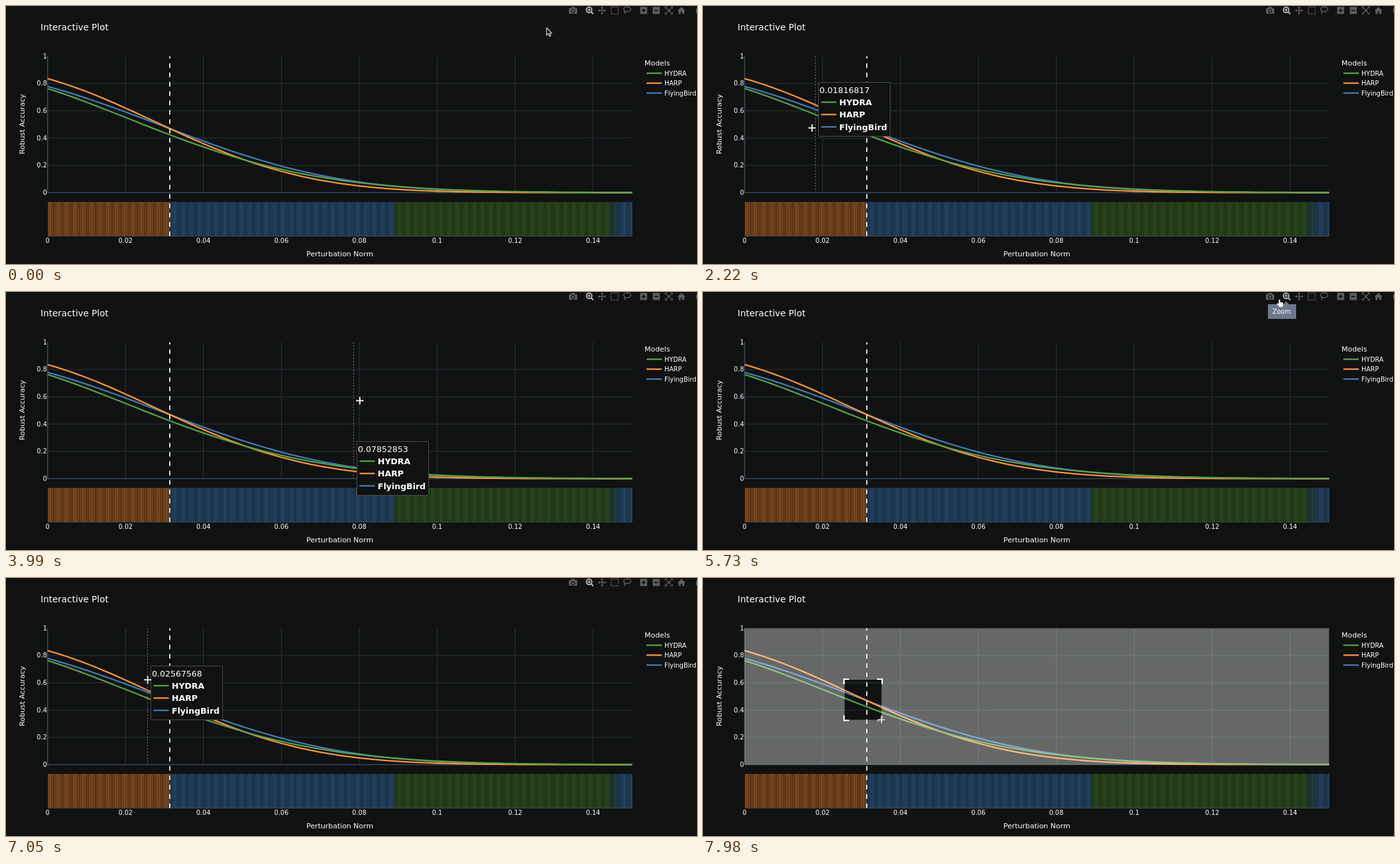
Animation, 1080 px wide and 403 px high, one loop 8000 ms. Source, as an HTML page with a canvas:

```html
<!DOCTYPE html>
<html lang="en">
<head>
<meta charset="utf-8">
<title>Interactive Plot</title>
<style>
html, body { margin: 0; width: 100%; height: 100%; overflow: hidden; background: #101211; }
canvas { display: block; width: 1080px; height: 403px; }
</style>
</head>
<body>
<canvas id="stage" width="1080" height="403"></canvas>
<script>
const LOOP = 8000, W = 1080, H = 403, TAU = Math.PI * 2;
const BG = '#101211', GRID = '#283340', ICON = '#5c5e5e';
const FONT = 'Verdana, "DejaVu Sans", sans-serif';
const plot = { x0: 65, x1: 978.5, y0: 78.5, y1: 291.5 };
const strip = { y0: 306, y1: 359.5 };
const STEPS = 999, X_MAX = 0.15;
const stage = document.getElementById('stage').getContext('2d');
let g = stage;

const xPx = v => plot.x0 + v / X_MAX * (plot.x1 - plot.x0);
const yPx = v => plot.y1 - v * (plot.y1 - plot.y0);
const clamp = v => Math.max(0, Math.min(1, v));
const smooth = u => u * u * (3 - 2 * u);

// Accuracy decays as start * exp(-(a u + b u^2 + c u^3)), u = norm / 0.01
const models = [
  { name: 'HYDRA', color: '#58a045', start: 0.763, a: 0.1184, b: 0.0219, c: 0 },
  { name: 'HARP', color: '#fb942f', start: 0.836, a: 0.0944, b: 0.0259, c: 0.00083 },
  { name: 'FlyingBird', color: '#3e7cba', start: 0.779, a: 0.1011, b: 0.0166, c: 0.00085 }
];

function curveY(m, norm) {
  const u = norm / 0.01;
  return yPx(m.start * Math.exp(-u * (m.a + m.b * u + m.c * u * u)));
}

// Turning points of the pointer, eased in between
const path = [
  { t: 1250, x: 845, y: 34 },
  { t: 2232, x: 170.2, y: 190.5 },
  { t: 2960, x: 292.7, y: 163.3 },
  { t: 3420, x: 227, y: 163.3 },
  { t: 4018, x: 554.9, y: 169.8 },
  { t: 4980, x: 901.5, y: 12 },
  { t: 5730, x: 901.5, y: 12 },
  { t: 6980, x: 221.4, y: 159 },
  { t: 7300, x: 221.4, y: 159 },
  { t: 7970, x: 279, y: 221.5 }
];
const PRESS = 7060, DRAG = 7300;

function pointer(t) {
  const next = path.findIndex(p => p.t > t);
  if (next < 0) return path[path.length - 1];
  if (next === 0) return path[0];
  const a = path[next - 1], b = path[next];
  const s = smooth((t - a.t) / (b.t - a.t));
  return { x: a.x + s * (b.x - a.x), y: a.y + s * (b.y - a.y) };
}

const inPlot = p => p.x >= plot.x0 && p.x <= plot.x1 && p.y >= plot.y0 && p.y <= plot.y1;

function text(str, x, midY, size, align = 'left', weight = 'normal') {
  g.font = `${weight} ${size}px ${FONT}`;
  g.textAlign = align;
  g.fillStyle = '#fff';
  g.fillText(str, x, midY + size * 0.365);
}

function line(points, color, width = 1, dash = []) {
  g.strokeStyle = color;
  g.lineWidth = width;
  g.setLineDash(dash);
  g.beginPath();
  points.forEach(([x, y]) => g.lineTo(x, y));
  g.stroke();
  g.setLineDash([]);
}

function rect(x, y, w, h, color) {
  g.fillStyle = color;
  g.fillRect(x, y, w, h);
}

function frameRect(x, y, w, h, color, width = 1, dash = []) {
  line([[x, y], [x + w, y], [x + w, y + h], [x, y + h], [x, y]], color, width, dash);
}

function polygon(points, fill) {
  g.beginPath();
  points.forEach(([x, y]) => g.lineTo(x, y));
  g.closePath();
  g.fillStyle = fill;
  g.fill();
}

function ring(x, y, rx, ry, color, width) {
  g.beginPath();
  g.ellipse(x, y, rx, ry, 0, 0, TAU);
  g.strokeStyle = color;
  g.lineWidth = width;
  g.stroke();
}

// Thin bars beating against the pixel grid
function drawStrip() {
  const bands = [
    { end: 256, rgb: [150, 88, 38] },
    { end: 608, rgb: [44, 82, 119] },
    { end: 945, rgb: [51, 87, 35] },
    { end: 957, rgb: [40, 76, 75] },
    { end: plot.x1, rgb: [44, 82, 119] }
  ];
  for (let x = plot.x0; x < plot.x1; x++) {
    const { rgb } = bands.find(b => x < b.end);
    const light = 0.7 + 0.24 * Math.sin(TAU * x / 2.743) + 0.07 * Math.sin(TAU * x / 13);
    rect(x, strip.y0, 1, strip.y1 - strip.y0, `rgb(${rgb.map(v => v * light)})`);
  }
  line([[plot.x0, strip.y1], [plot.x1, strip.y1]], '#3a4654');
}

function drawChart() {
  rect(0, 0, W, H, BG);
  text('Interactive Plot', 54, 32.7, 14);
  for (let i = 0; i < 8; i++) {
    const v = i * 0.02, x = xPx(v);
    if (i) line([[x, plot.y0], [x, plot.y1]], GRID);
    text(String(+v.toFixed(2)), x, 366, 10, 'center');
  }
  for (let i = 0; i < 6; i++) {
    const y = yPx(i / 5);
    if (i && i < 5) line([[plot.x0, y], [plot.x1, y]], GRID);
    text(String(i / 5), 64, y - 0.4, 10, 'right');
  }
  line([[plot.x0, plot.y0], [plot.x0, plot.y1], [plot.x1, plot.y1]], '#364759', 1.6);
  text('Perturbation Norm', 521.7, 387.3, 11.3, 'center');
  g.save();
  g.translate(25, 184.5);
  g.rotate(-Math.PI / 2);
  text('Robust Accuracy', 0, 0, 11.3, 'center');
  g.restore();

  drawStrip();
  g.lineJoin = 'round';
  const norms = Array.from({ length: 61 }, (_, i) => i / 60 * X_MAX);
  for (const m of [...models].reverse()) line(norms.map(v => [xPx(v), curveY(m, v)]), m.color, 2.3);
  g.lineJoin = 'miter';

  text('Models', 998, 89, 11.3);
  models.forEach((m, i) => {
    const y = 105 + i * 15.5;
    line([[1001, y], [1025, y]], m.color, 2.3);
    text(m.name, 1029, y + 0.3, 10);
  });
}

function drawMarker() {
  line([[256, strip.y1], [256, plot.y0]], '#fff', 1.7, [7.3, 7.3]);
}

// Each icon is drawn around its own centre
const icons = {
  camera() {
    rect(-6.5, -3.5, 13, 8.5, ICON);
    rect(-3, -5.5, 6, 3, ICON);
    ring(0, 0.7, 2.6, 2.6, BG, 1.2);
  },
  magnifier() {
    const lit = '#b4b6b6';
    ring(-0.5, -1, 4.2, 4.2, lit, 2);
    rect(-2.2, -2.7, 3.4, 3.4, lit);
    line([[2.5, 2], [6, 5.5]], lit, 2.2);
  },
  move() {
    for (let i = 0; i < 4; i++) {
      line([[0, 0], [5, 0]], ICON, 1.4);
      polygon([[6.5, 0], [3.8, -2.3], [3.8, 2.3]], ICON);
      g.rotate(TAU / 4);
    }
  },
  select() { frameRect(-5.5, -5.5, 11, 11, ICON, 1.5, [2, 1.4]); },
  lasso() {
    ring(0, -2, 5.6, 3.8, ICON, 1.5);
    line([[-4, 0.5], [-4.5, 3], [-2.5, 5.5]], ICON, 1.4);
  },
  minus() {
    rect(-5.5, -5.5, 11, 11, ICON);
    rect(-3, -0.9, 6, 1.8, BG);
  },
  plus() {
    icons.minus();
    rect(-0.9, -3, 1.8, 6, BG);
  },
  autoscale() {
    for (let i = 0; i < 4; i++) {
      line([[0, 0], [3.5, 3.5]], ICON, 1.5);
      line([[2.7, 5.5], [5.5, 5.5], [5.5, 2.7]], ICON, 1.4);
      g.rotate(TAU / 4);
    }
  },
  home() {
    polygon([[-6.5, 0.5], [0, -5.5], [6.5, 0.5]], ICON);
    rect(-4.5, 0, 9, 5.5, ICON);
    rect(-1.2, 2, 2.4, 3.5, BG);
  },
  badge() { rect(-2, -3, 5, 7, '#a9abab'); }
};

function drawModebar(alpha) {
  if (alpha <= 0) return;
  const groups = [['camera'], ['magnifier', 'move', 'select', 'lasso'], ['plus', 'minus', 'autoscale', 'home'], ['badge']];
  let x = 886.3;
  for (const group of groups) {
    for (const name of group) {
      g.save();
      g.globalAlpha = alpha;
      g.translate(x, 7);
      icons[name]();
      g.restore();
      x += 19.7;
    }
    x += 5.9;
  }
}

function drawHover(p) {
  const index = Math.round((p.x - plot.x0) / (plot.x1 - plot.x0) * STEPS);
  const value = index * X_MAX / STEPS, x = xPx(value);
  const middle = models.reduce((sum, m) => sum + curveY(m, value), 0) / models.length;
  const top = Math.round(middle - 43) + 0.5, left = Math.round(x + 4.5) + 0.5;
  line([[x, plot.y0], [x, plot.y1]], '#636565', 1.2, [2.4, 2.4]);
  rect(left, top, 112, 84, BG);
  frameRect(left, top, 112, 84, '#4a4c4c');
  text(value.toFixed(8), left + 1.5, top + 12, 13);
  models.forEach((m, i) => {
    const y = top + 30.7 + i * 19.3;
    line([[left + 4, y], [left + 28, y]], m.color, 2.3);
    text(m.name, left + 32.5, y, 13, 'left', 'bold');
  });
}

function drawZoomBox(from, to, fade) {
  const w = to.x - from.x, h = to.y - from.y;
  g.fillStyle = `rgba(255,255,255,${0.36 * fade})`;
  g.beginPath();
  g.rect(plot.x0, plot.y0, plot.x1 - plot.x0, plot.y1 - plot.y0);
  g.rect(from.x, from.y, w, h);
  g.fill('evenodd');
  const arm = Math.min(8, w / 2, h / 2);
  g.globalAlpha = fade;
  for (const [x, sx] of [[from.x - 1, 1], [to.x + 1, -1]])
    for (const [y, sy] of [[from.y - 1, 1], [to.y + 1, -1]])
      line([[x + sx * arm, y], [x, y], [x, y + sy * arm]], '#fff', 2.2);
  g.globalAlpha = 1;
}

function drawZoomTip() {
  polygon([[907, 19.5], [911.5, 14.5], [916, 19.5]], '#6c788d');
  rect(883, 19, 44, 23, '#6c788d');
  text('Zoom', 904.5, 30.7, 10, 'center');
}

const cursors = {
  cross() {
    for (const [r, width, color] of [[6.2, 3.2, '#333'], [5.7, 1.8, '#f2f2f2']]) {
      line([[-r, 0], [r, 0]], color, width);
      line([[0, -r], [0, r]], color, width);
    }
  },
  hand() {
    g.lineCap = 'round';
    line([[-0.5, 1], [-0.5, 7]], '#f4f4f4', 2.4);
    line([[-3.5, 6.5], [-1, 9]], '#f4f4f4', 2);
    g.beginPath();
    g.roundRect(-1.8, 4, 7, 7.5, 2);
    g.fillStyle = '#f4f4f4';
    g.fill();
  },
  arrow() {
    const shape = [[0, 0], [0, 11.5], [2.6, 9.2], [4.5, 13.3], [6.4, 12.4], [4.6, 8.5], [8, 8.2], [0, 0]];
    polygon(shape, '#0a0a0a');
    line(shape, '#eee', 1.1);
  }
};

function drawCursor(p, kind) {
  g.save();
  g.translate(p.x, p.y);
  cursors[kind]();
  g.restore();
}

const chart = document.createElement('canvas');
chart.width = W;
chart.height = H;
g = chart.getContext('2d');
drawChart();
g = stage;

function render(t) {
  const p = pointer(t), dragging = t > DRAG + 30;
  const onZoom = p.x >= 901 && p.x <= 921 && p.y < 16;
  g.drawImage(chart, 0, 0);
  if (dragging) drawZoomBox(pointer(DRAG), p, clamp((t - DRAG) / 200));
  drawMarker();
  drawModebar(1 - clamp((t - PRESS) / 270));
  // The label trails the pointer slightly
  const trail = pointer(t - 40);
  if (!dragging && inPlot(p) && inPlot(trail)) drawHover(trail);
  if (onZoom) drawZoomTip();
  drawCursor(p, inPlot(p) ? 'cross' : onZoom ? 'hand' : 'arrow');
}

const start = performance.now();
function frame() {
  render((performance.now() - start) % LOOP);
  requestAnimationFrame(frame);
}
frame();
</script>
</body>
</html>
```
